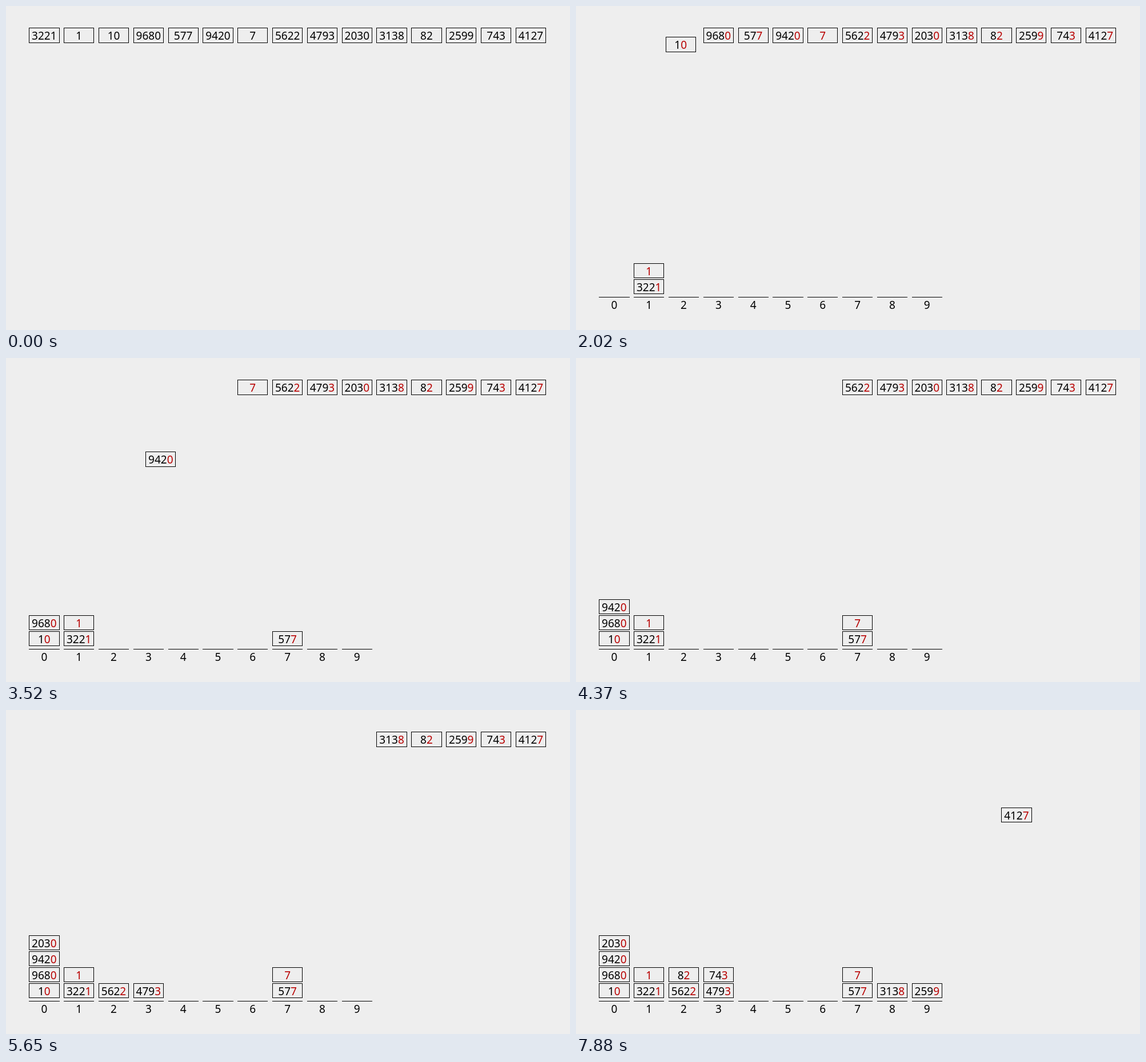
Write an HTML page with a canvas that moves like this. It is 987 px wide and 568 px high and loops after 8 s.

```html
<!DOCTYPE html>
<html lang="en">
<head>
<meta charset="utf-8">
<title>Radix sort</title>
<style>
  html, body { margin: 0; width: 100%; height: 100%; overflow: hidden; background: #eee; }
  canvas { display: block; }
</style>
</head>
<body>
<canvas id="stage" width="987" height="568"></canvas>
<script>
const ctx = document.getElementById('stage').getContext('2d');

// Timing in ms: items leave one after another, the picture refreshes once per tick.
const LOOP = 8000, MARK = 500, FIRST = 1028.6, EVERY = 483.2, MOVE = 158;
const TICK_FROM = 1020, TICK = 124.3;

const LEFT = 40.2, PITCH = 60.825, BOX_W = 53.3, BOX_H = 26.65;
const TOP = 38, FLOOR = 478.6, ROW = 28, RULE_Y = 510, BASE = 21;
const INK = '#000', RED = '#b80000', PAPER = '#eee';

const values = [3221, 1, 10, 9680, 577, 9420, 7, 5622, 4793, 2030, 3138, 82, 2599, 743, 4127];

const column = i => LEFT + PITCH * i;
const swing = p => 0.5 - Math.cos(Math.PI * p) / 2;
const mix = (a, b, f) => a + (b - a) * f;
const held = t => TICK_FROM + TICK * Math.floor((t - TICK_FROM) / TICK);

const filled = Array(10).fill(0);
const items = values.map((value, i) => {
  const bucket = value % 10;
  return {
    text: String(value),
    start: FIRST + EVERY * i,
    x0: column(i),
    x1: column(bucket),
    y1: FLOOR - ROW * filled[bucket]++
  };
});

function place(item, t) {
  const p = (t - item.start) / MOVE;
  if (p <= 0) return [item.x0, TOP];
  if (p >= 1) return [item.x1, item.y1];
  const f = swing(p);
  return [mix(Math.floor(item.x0), Math.floor(item.x1), f), mix(TOP, item.y1, f)];
}

function drawText(text, x, baseline, marked) {
  const head = marked ? text.slice(0, -1) : text;
  const left = x + (BOX_W - ctx.measureText(text).width) / 2;
  ctx.fillStyle = INK;
  ctx.fillText(head, left, baseline);
  if (marked) {
    ctx.fillStyle = RED;
    ctx.fillText(text.slice(-1), left + ctx.measureText(head).width, baseline);
  }
}

function drawItem(item, t, marked) {
  const [x, y] = place(item, t);
  const l = Math.round(x), r = Math.round(x + BOX_W);
  const top = Math.round(y), bottom = Math.round(y + BOX_H);
  ctx.strokeStyle = INK;
  ctx.lineWidth = 1;
  ctx.strokeRect(l + 0.5, top + 0.5, r - l - 1, bottom - top - 1);
  drawText(item.text, x, top + BASE, marked);
}

function drawBucket(n) {
  const x = column(n), l = Math.round(x);
  ctx.fillStyle = INK;
  ctx.fillRect(l, RULE_Y, Math.round(x + BOX_W) - l, 1);
  drawText(String(n), x, RULE_Y + BASE, false);
}

function draw(t) {
  const marked = t >= MARK;
  ctx.fillStyle = PAPER;
  ctx.fillRect(0, 0, 987, 568);
  ctx.font = '19px "Noto Sans", "Open Sans", sans-serif';
  ctx.textBaseline = 'alphabetic';
  if (marked) for (let n = 0; n < 10; n++) drawBucket(n);
  items.forEach(item => drawItem(item, held(t), marked));
}

const origin = performance.now();
function frame() {
  draw((performance.now() - origin) % LOOP);
  requestAnimationFrame(frame);
}
frame();
</script>
</body>
</html>
```
